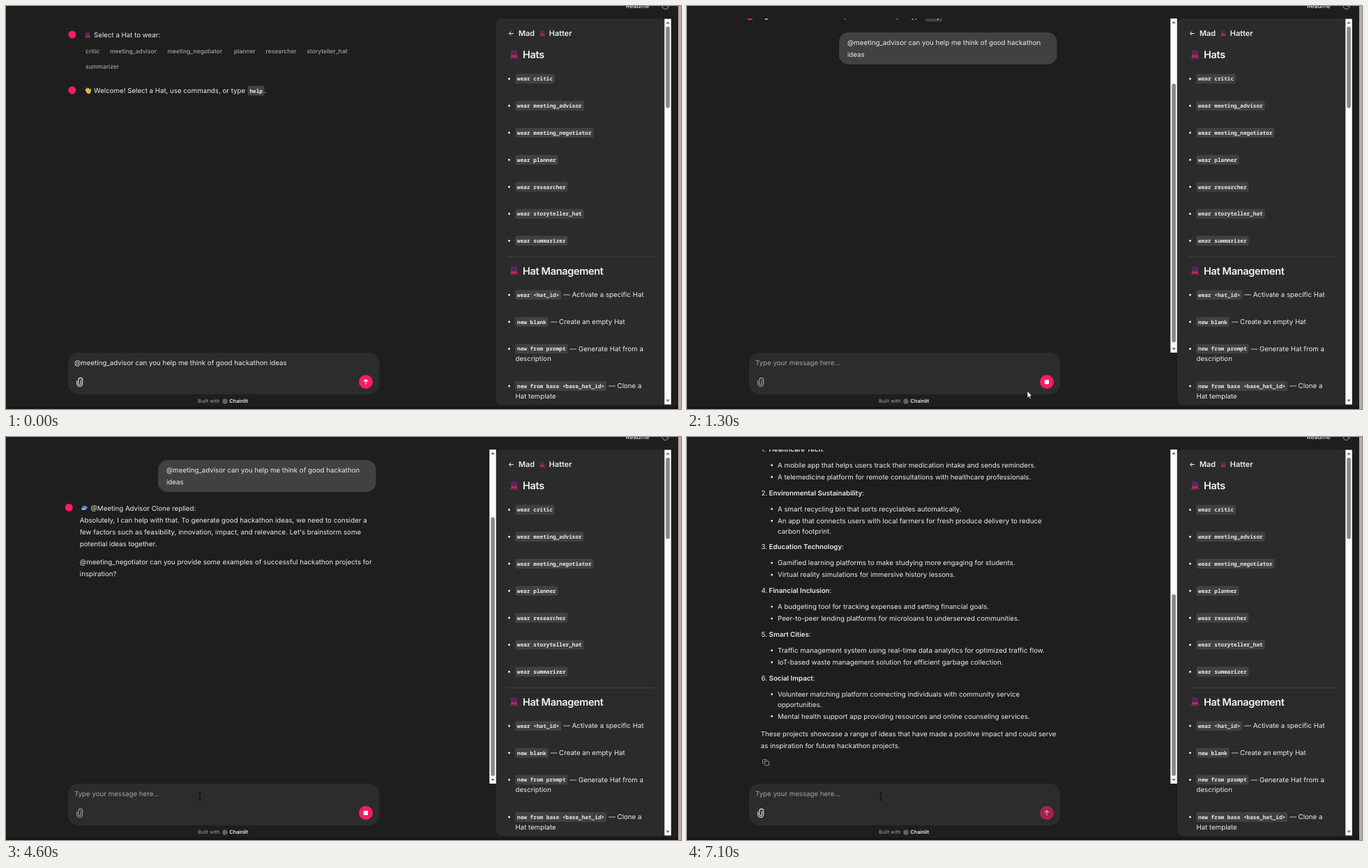
Write an HTML page that moves like this. It is 968 px wide and 579 px high and loops after 7200 ms.

```html
<!DOCTYPE html>
<html lang="en">
<head>
<meta charset="utf-8">
<title>Hat chat</title>
<style>
html, body { margin: 0; width: 100%; height: 100%; overflow: hidden; background: #1f1e1f; }
svg { display: block; width: 968px; height: 579px; font-family: Inter, sans-serif; text-rendering: geometricPrecision; }
text { white-space: pre; }
.mono { font-family: "Noto Sans Mono", "DejaVu Sans Mono", monospace; }
.line { fill: none; stroke-linecap: round; stroke-linejoin: round; }
</style>
</head>
<body>
<svg id="stage" viewBox="0 0 968 579"></svg>
<script>
const LOOP = 7200, BODY = 9.71, SMALL = 8.5, CELL = 4.64;
const WHITE = '#ececec', MUTED = '#a3a3a3', PINK = '#f81d5f';

const esc = s => s.replace(/</g, '&lt;').replace(/>/g, '&gt;');
const rect = (x, y, w, h, fill, r = 0) => `<rect x="${x}" y="${y}" width="${w}" height="${h}" rx="${r}" fill="${fill}"/>`;
const dot = (x, y, r, fill) => `<circle cx="${x}" cy="${y}" r="${r}" fill="${fill}"/>`;
const line = (d, color, w = 1) => `<path class="line" d="${d}" stroke="${color}" stroke-width="${w}"/>`;
const group = (id, body, attrs = '') => `<g id="${id}" ${attrs}>${body}</g>`;

// y is the middle of the capitals
const text = (x, y, s, size = BODY, fill = WHITE, weight = 400, attrs = '') =>
  `<text x="${x}" y="${y + size * .364}" font-size="${size}" fill="${fill}" font-weight="${weight}" ${attrs}>${s}</text>`;

const codeWidth = s => s.length * CELL + 5.6;
const code = (x, y, s) => rect(x, y - 7, codeWidth(s), 14, '#414141', 2.5) +
  text(x + 2.8, y, esc(s), CELL / .6, WHITE, 700, 'class="mono"');

const hat = (x, y, s) => `<g transform="translate(${x} ${y}) scale(${s})">` +
  rect(-4.5, -6, 9, 10, '#54285c', 1) + rect(-4.5, 1, 9, 3, '#d91f4c') + rect(-6.5, 4, 13, 2, '#6b2a5a', 1) + '</g>';

const wave = (x, y) => `<g transform="translate(${x} ${y}) rotate(-30)">` +
  `<ellipse cy="1" rx="3" ry="3.6" fill="#e5b04c"/>` +
  line('M-2 0V-3M0 -1V-4.2M2 0V-3M3 2L4.4 0', '#f0c665', 1.5) + '</g>';

const cap = (x, y) => `<path d="M${x - 4} ${y + 1}a4 4 0 0 1 8 0z" fill="#4c8fd6"/>` +
  `<ellipse cx="${x - 1.5}" cy="${y + 1.8}" rx="3.5" ry="1.3" fill="#9cb9dc"/>`;

const avatar = y => dot(90.3, y, 5.5, PINK);

const scrollbar = (x, y, h, id, thumb) => rect(x, y, 9.5, h, '#fafafa') +
  `<path d="M${x + 2} ${y + 7}l2.8 -3.6 2.8 3.6zM${x + 2} ${y + h - 7}l2.8 3.6 2.8 -3.6z" fill="#777"/>` +
  `<rect id="${id}" x="${x + 2}" y="${y + 11}" width="5.6" height="${thumb}" rx="2.8" fill="#888"/>`;

function sidebar() {
  const item = (y, cmd, note = '', more = '') => dot(721.5, y, 1.5, WHITE) + code(730.3, y, cmd) +
    (note && text(730.3 + codeWidth(cmd) + 3, y - .5, '— ' + note)) + (more && text(730.5, y + 14.2, more));
  const title = (y, s) => hat(728.5, y, 1) + text(741, y, s, 14.57, '#f4f4f4', 600, 'letter-spacing="-.36"');
  const hats = ['critic', 'meeting_advisor', 'meeting_negotiator', 'planner', 'researcher', 'storyteller_hat', 'summarizer'];
  return rect(703, 18, 251, 555, '#2b2b2b', 8) +
    line('M727.5 39.5h-6M724 37l-2.6 2.5 2.6 2.5', WHITE) +
    text(735, 39.3, 'Mad', 10.93, WHITE, 600) + hat(769, 39.5, .7) + text(778.8, 39.3, 'Hatter', 10.93, WHITE, 600) +
    title(69.7, 'Hats') + hats.map((h, i) => item(104.5 + i * 38.8, 'wear ' + h)).join('') +
    rect(719, 360, 212, .8, '#454545') + title(380.3, 'Hat Management') +
    item(415, 'wear <hat_id>', 'Activate a specific Hat') +
    item(453.8, 'new blank', 'Create an empty Hat') +
    item(492.6, 'new from prompt', 'Generate Hat from a', 'description') +
    item(546, 'new from base <base_hat_id>', 'Clone a', 'Hat template') +
    scrollbar(944.3, 18.5, 554, 'sideThumb', 117);
}

function intro() {
  const hats = [[109.5, 'critic'], [144.3, 'meeting_advisor'], [226.8, 'meeting_negotiator'], [322.4, 'planner'],
    [368, 'researcher'], [426.7, 'storyteller_hat']];
  return avatar(41) + hat(112.5, 41.8, .65) + text(121.5, 41.2, 'Select a Hat to wear:') +
    group('hats', hats.map(([x, s]) => text(x, 65.4, s, SMALL, 'inherit', 500)).join('') +
      text(109.5, 87.2, 'summarizer', SMALL, 'inherit', 500)) +
    avatar(121) + wave(113, 121.8) + text(121.5, 121.3, 'Welcome! Select a Hat, use commands, or type') +
    code(342, 121.8, 'help') + text(366.5, 121.3, '.');
}

const question = () => rect(218, 144.3, 312.6, 46, '#414141', 14) +
  text(230, 159, '@meeting_advisor can you help me think of good hackathon') + text(230, 176, 'ideas');

const reply = () => avatar(212.5) + cap(113, 213) + text(121.5, 213.2, '@Meeting Advisor Clone replied:') +
  ['Absolutely, I can help with that. To generate good hackathon ideas, we need to consider a',
   'few factors such as feasibility, innovation, impact, and relevance. Let\'s brainstorm some',
   'potential ideas together.'].map((s, i) => text(105.8, 230.2 + 17 * i, s)).join('') +
  text(105.8, 291, '@meeting_negotiator can you provide some examples of successful hackathon projects for') +
  text(105.8, 308, 'inspiration?');

function answer() {
  const ideas = [
    ['Healthcare Tech', 'A mobile app that helps users track their medication intake and sends reminders.',
      'A telemedicine platform for remote consultations with healthcare professionals.'],
    ['Environmental Sustainability', 'A smart recycling bin that sorts recyclables automatically.',
      'An app that connects users with local farmers for fresh produce delivery to reduce|carbon footprint.'],
    ['Education Technology', 'Gamified learning platforms to make studying more engaging for students.',
      'Virtual reality simulations for immersive history lessons.'],
    ['Financial Inclusion', 'A budgeting tool for tracking expenses and setting financial goals.',
      'Peer-to-peer lending platforms for microloans to underserved communities.'],
    ['Smart Cities', 'Traffic management system using real-time data analytics for optimized traffic flow.',
      'IoT-based waste management solution for efficient garbage collection.'],
    ['Social Impact', 'Volunteer matching platform connecting individuals with community service|opportunities.',
      'Mental health support app providing resources and online counseling services.']];
  let y = 379.5;
  let out = avatar(336) + cap(113, 336.5) + text(121.5, 336.5, '@Meeting Advisor Clone replied:') +
    text(105.8, 353.5, 'Here are some examples of successful hackathon projects:');
  ideas.forEach(([title, ...items], i) => {
    out += text(106.5, y, `${i + 1}. <tspan x="117.6" font-weight="600">${title}</tspan>:`);
    y += 23.2;
    items.forEach((item, k) => {
      out += dot(121.7, y, 1.4, WHITE);
      item.split('|').forEach((s, n) => out += text(130, y += n * 14.6, s));
      y += k ? 22.7 : 17;
    });
  });
  y += 2.5;
  return out + text(105.8, y, 'These projects showcase a range of ideas that have made a positive impact and could serve') +
    text(105.8, y + 17, 'as inspiration for future hackathon projects.') +
    group('copy', rect(111.3, y + 39.5, 6, 6, 'none', 1) +
      line(`M111.5 ${y + 39.5}h5q1 0 1 1v4q0 1 -1 1h-4q-1 0 -1 -1zM109.5 ${y + 43}q-1 0 -1 -1v-4q0 -1 1 -1h4q1 0 1 1`, MUTED, .9));
}

const composer = () => rect(89, 498, 446.5, 60, '#2c2c2c', 15) +
  group('draft', text(98, 512.8, '@meeting_advisor can you help me think of good hackathon ideas')) +
  group('hint', text(98, 512.8, 'Type your message here...', BODY, MUTED)) +
  group('clip', line('M107.3 537.5v5a1.7 1.7 0 0 1 -3.4 0v-5.2a2.9 2.9 0 0 1 5.8 0v5.2a4 4 0 0 1 -8 0v-4', WHITE, 1.1)) +
  group('send', dot(516, 540, 10, PINK) +
    group('arrow', line('M516 543.3v-6.5M513.2 539.3l2.8 -2.8 2.8 2.8', '#fff', 1.2)) +
    group('stop', rect(512.8, 537, 6.2, 6.2, '#fff', .8))) +
  text(275, 567.8, 'Built with', 7.3, MUTED) + dot(314, 568, 3.7, '#626262') + text(320.3, 567.8, 'Chainlit', 7.3, WHITE, 600);

const pointers = () =>
  group('hand', '<path d="M-1.5 -1q1.3 -1.4 2.3 0v4l5 1q1.6 .6 1.3 2.4l-.8 5h-6l-3.8 -5q-.2 -1.8 1.6 -1z" fill="#fff" stroke="#111" stroke-width=".9"/>') +
  group('tip', '<path d="M0 0v10l2.3 -2 1.5 3.4 1.5 -.7 -1.5 -3.2h3z" fill="#fff" stroke="#111" stroke-width=".7"/>') +
  group('beam', line('M-1.6 -5h3.2M0 -5v10M-1.6 5h3.2', '#070707', 1));

document.getElementById('stage').innerHTML =
  '<clipPath id="view"><rect y="18" width="693" height="480"/></clipPath>' +
  rect(0, 0, 968, 579, '#1f1e1f') + rect(0, 575.5, 968, 4, '#191516') + rect(964, 0, 4, 579, '#bda9a9') +
  text(889, 0, 'Readme', 8.6, WHITE, 500) + line('M941 0a4.5 4.5 0 0 0 9 0h-4v-4', MUTED) +
  `<g clip-path="url(#view)">${group('chat', intro() + group('question', question()) + group('reply', reply()) + group('answer', answer()))}</g>` +
  group('bar', scrollbar(693.3, 18, 480, 'thumb', 372)) + sidebar() + composer() + pointers();

const $ = id => document.getElementById(id);
const show = (id, on) => $(id).style.display = on ? '' : 'none';
const ease = (t, start, length) => {
  const p = Math.min(1, Math.max(0, (t - start) / length));
  return p * p * (3 - 2 * p);
};

// time, x, y
const path = [[400, 590, 579], [900, 516, 540], [1100, 516, 540], [1200, 506, 551], [1300, 488, 553], [1500, 385, 528], [1800, 278, 516.5]];
function pointerAt(t) {
  const i = path.findIndex(p => p[0] > t);
  if (i < 0) return path[path.length - 1].slice(1);
  if (!i) return path[0].slice(1);
  const [t0, x0, y0] = path[i - 1], [t1, x1, y1] = path[i], k = (t - t0) / (t1 - t0);
  return [x0 + (x1 - x0) * k, y0 + (y1 - y0) * k];
}

function draw(t) {
  const sent = t >= 1000, answered = t >= 6400, done = t >= 7000, busy = sent && !done;
  const scroll = 108.8 * ease(t, 1085, 236) + 2.4 * ease(t, 2950, 250) + 251 * ease(t, 6330, 270);
  const height = answered ? 842 : 591;
  $('chat').setAttribute('transform', `translate(${sent ? 0 : 4.6} ${-scroll})`);
  $('hats').setAttribute('fill', sent ? '#6b6b6b' : MUTED);
  $('thumb').setAttribute('y', 29 + 458 * scroll / height);
  $('thumb').setAttribute('height', 458 * 480 / height);
  show('question', sent);
  show('bar', sent);
  show('reply', t >= 3000);
  show('answer', answered);
  show('copy', done);
  show('draft', !sent);
  show('hint', sent);
  show('arrow', !busy);
  show('stop', busy);
  $('clip').style.opacity = busy ? .6 : 1;
  $('send').style.opacity = done ? .6 : 1;

  const pointer = t < 400 ? '' : t < 900 ? 'tip' : t < 1200 ? 'hand' : t < 1400 ? 'tip' : 'beam';
  const [x, y] = pointerAt(t);
  for (const id of ['hand', 'tip', 'beam']) {
    show(id, id === pointer);
    $(id).setAttribute('transform', `translate(${x} ${y})`);
  }
}

function tick() {
  draw(Math.floor(performance.now() % LOOP / 100) * 100);
  requestAnimationFrame(tick);
}
tick();
</script>
</body>
</html>
```
